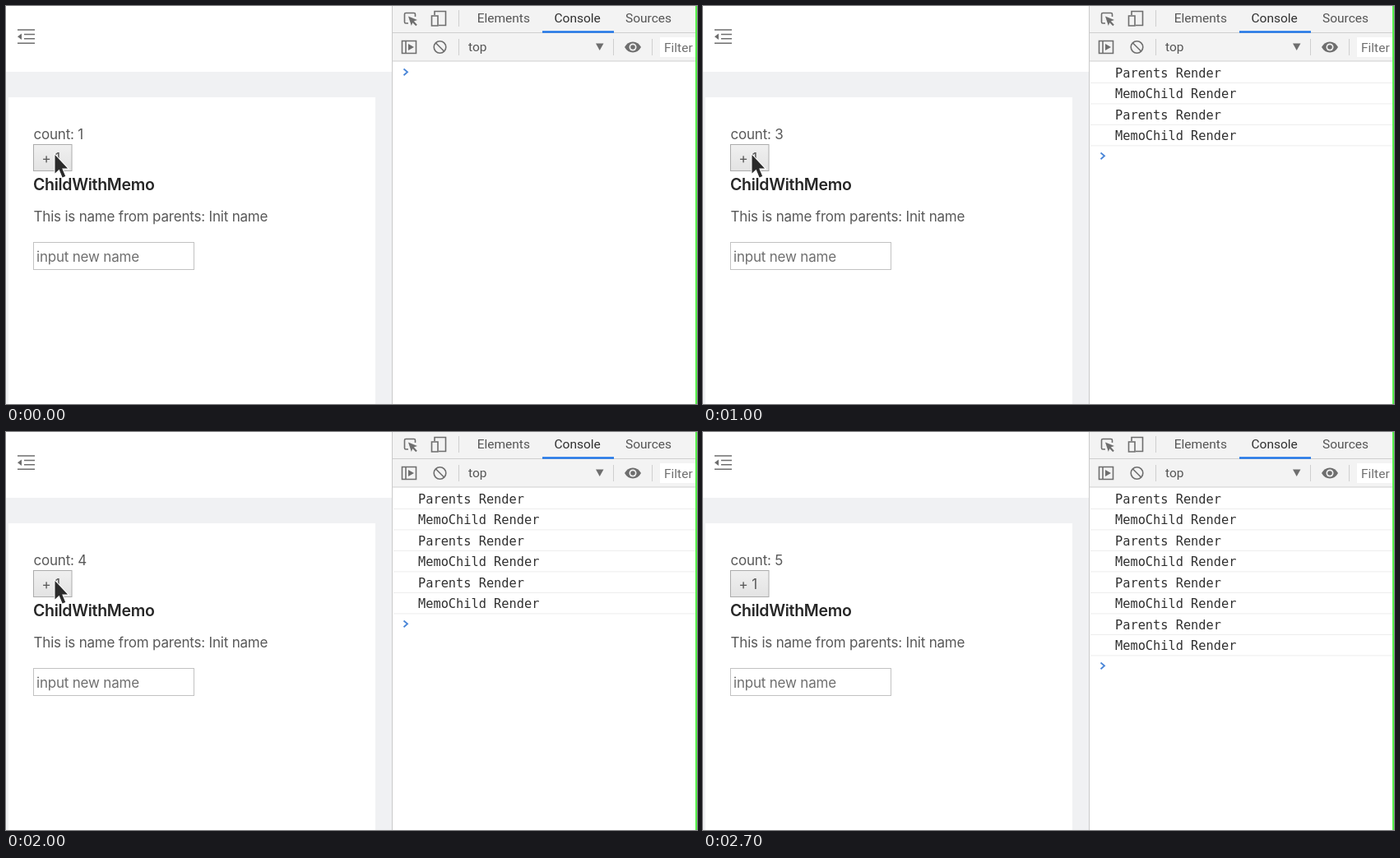
Write an HTML page that moves like this. It is 840 by 484 pixels and loops after 3000 ms.

```html
<!DOCTYPE html>
<html lang="en">
<head>
<meta charset="utf-8">
<title>Console render log</title>
<style>
  html, body { margin: 0; width: 100%; height: 100%; overflow: hidden; background: #fff; }
  svg { display: block; width: 840px; height: 484px; }
  text { white-space: pre; }
  .page { font: 17px Inter, sans-serif; letter-spacing: -.2px; fill: #595959; }
  .page .title { font-size: 19.5px; font-weight: 600; letter-spacing: -.3px; fill: #262626; }
  .page .hint { fill: #707070; }
  .tools { font: 15.5px Roboto, sans-serif; fill: #555; }
  .tools .on { fill: #303030; }
  .tools .hint { fill: #707070; }
  .log { font: 15.3px "DejaVu Sans Mono", monospace; fill: #303030; }
  .icon { fill: none; stroke: #6e6e6e; stroke-width: 1.6; }
  .solid { fill: #6e6e6e; }

  .counts, .rest, .press, .cursor { animation: 3s step-end infinite; }
  .counts { animation-name: count; }
  .rest { animation-name: log; }
  .press { animation-name: press; opacity: 0; }
  .cursor { animation-name: leave; }

  @keyframes count {
    0% { transform: translateY(0); }
    6.667% { transform: translateY(-30px); }
    30% { transform: translateY(-60px); }
    53.333% { transform: translateY(-90px); }
    73.333%, 100% { transform: translateY(-120px); }
  }
  @keyframes log {
    0% { transform: translateY(0); }
    6.667% { transform: translateY(51px); }
    30% { transform: translateY(102px); }
    53.333% { transform: translateY(153px); }
    73.333%, 100% { transform: translateY(204px); }
  }
  @keyframes press {
    0%, 6.667%, 30%, 53.333%, 73.333%, 100% { opacity: 0; }
    3.333%, 26.667%, 50%, 70% { opacity: 1; }
  }
  @keyframes leave {
    0% { opacity: 1; }
    80%, 100% { opacity: 0; }
  }
</style>
</head>
<body>
<svg viewBox="0 0 840 484">
  <defs>
    <linearGradient id="face" x2="0" y2="1">
      <stop stop-color="#f0f0f0"/>
      <stop offset="1" stop-color="#e3e3e3"/>
    </linearGradient>
    <clipPath id="countLine"><rect x="30" y="144" width="120" height="23"/></clipPath>
    <g id="pair">
      <text x="501" y="87">Parents Render</text>
      <text x="501" y="112.4">MemoChild Render</text>
      <path d="M471 93.5H838M471 118.9H838" stroke="#ededed"/>
    </g>
    <path id="arrow" d="M59.5 181V203.5L64.6 198.8L68.6 208.5L72.2 207L68.2 197.5H75Z"
          stroke="#fff" stroke-width="2" paint-order="stroke"/>
  </defs>

  <rect width="840" height="484" fill="#fff"/>

  <!-- page -->
  <rect y="80" width="469" height="404" fill="#f0f1f3"/>
  <rect x="3" y="111" width="446" height="373" fill="#fff"/>
  <path class="icon" d="M14 29H35M22 34.5H35M22 39.8H35M14 45.2H35"/>
  <path class="solid" d="M14 37.2L19 33.5V41Z"/>

  <g class="page">
    <g clip-path="url(#countLine)">
      <g class="counts">
        <text x="33.5" y="161.5">count: 1</text>
        <text x="33.5" y="191.5">count: 2</text>
        <text x="33.5" y="221.5">count: 3</text>
        <text x="33.5" y="251.5">count: 4</text>
        <text x="33.5" y="281.5">count: 5</text>
      </g>
    </g>
    <rect x="33.5" y="168.5" width="46.5" height="32" fill="url(#face)" stroke="#acacac"/>
    <text x="43.5" y="191">+ 1</text>
    <text class="title" x="33" y="224">ChildWithMemo</text>
    <text x="33.5" y="262">This is name from parents: Init name</text>
    <rect x="33.5" y="287.5" width="195" height="33" fill="#fff" stroke="#c2c2c2"/>
    <text class="hint" x="37" y="310.5">input new name</text>
  </g>

  <!-- console -->
  <g class="log">
    <use href="#pair"/>
    <use href="#pair" y="51"/>
    <use href="#pair" y="102"/>
    <use href="#pair" y="153"/>
  </g>
  <g class="rest">
    <rect x="470" y="69" width="368" height="415" fill="#fff"/>
    <path d="M483.5 76.5L488 80.3L483.5 84.2" fill="none" stroke="#4a86d8" stroke-width="1.8"/>
  </g>

  <!-- toolbars -->
  <rect x="470" width="368" height="67" fill="#f3f3f3"/>
  <path d="M470 32.5H838M470 67H838M550.5 5V25M550.5 40V60M738.5 40V60M785.5 40V60" stroke="#cfcfcf"/>
  <path d="M469.5 0V484" stroke="#cacaca"/>
  <rect x="652" y="30.3" width="87" height="2.4" fill="#1a73e8"/>
  <rect x="795" y="38" width="43" height="24" fill="#fff"/>

  <path class="icon" d="M489 21H486Q484.5 21 484.5 19.5V10Q484.5 8.5 486 8.5H496Q497.5 8.5 497.5 10V13"/>
  <path class="solid" d="M489 12.5L500 17L495.8 18.6L499.8 22.7L498.3 24.2L494.3 20.2L492.8 24Z"/>
  <path class="icon" d="M521 11V6.5H534.5V23.5H526M517.5 12H525V24H517.5Z"/>
  <path class="icon" d="M481.5 42.5H498.5V57.5H481.5ZM486 42.5V57.5"/>
  <path class="solid" d="M489 46L496 50L489 54Z"/>
  <circle class="icon" cx="527.5" cy="50" r="7.3"/>
  <path class="icon" d="M522.5 45L532.5 55"/>
  <path class="solid" d="M717 45.5H726.5L721.7 54Z"/>
  <path class="solid" d="M752 50Q755.5 43.5 762 43.5T772 50Q768.5 56.5 762 56.5T752 50Z"/>
  <circle cx="762" cy="50" r="4.5" fill="#f3f3f3"/>
  <circle class="solid" cx="762" cy="50" r="2.8"/>

  <g class="tools">
    <text x="572.7" y="20.3">Elements</text>
    <text class="on" x="666.5" y="20.3">Console</text>
    <text x="753" y="20.3">Sources</text>
    <text x="562" y="55">top</text>
    <text class="hint" x="800" y="56">Filter</text>
  </g>
  <rect x="838" width="2" height="484" fill="#55f04a"/>

  <!-- pointer -->
  <use class="cursor" href="#arrow" fill="#2b2b2b"/>
  <g class="press">
    <g fill="none">
      <circle cx="56.5" cy="179.5" r="38" stroke="#fff" stroke-width="6" stroke-opacity=".8"/>
      <circle cx="56.5" cy="179.5" r="38" stroke="#0a0a0a" stroke-width="3.8"/>
    </g>
    <use href="#arrow" fill="#0a0a0a"/>
  </g>
</svg>
</body>
</html>
```
